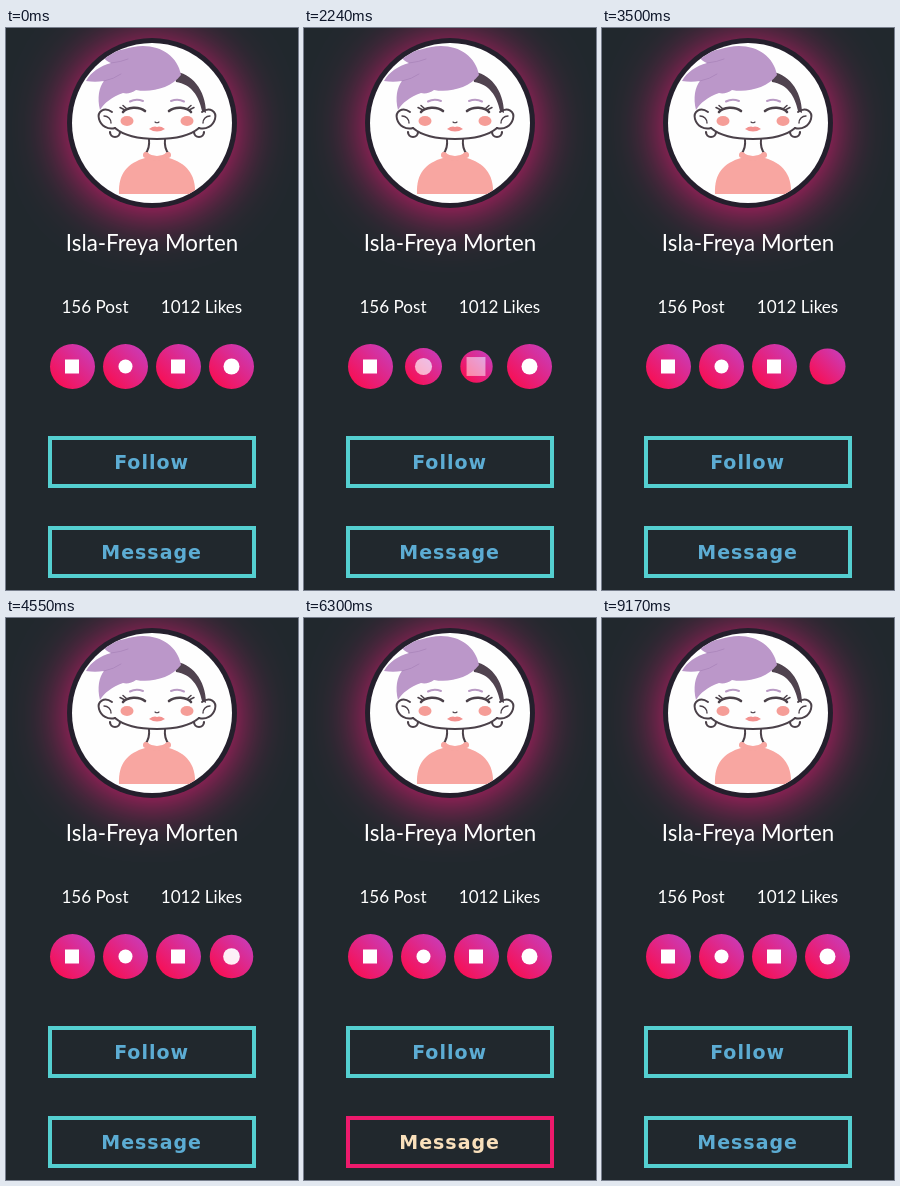
Animation, 292 px wide and 562 px high, one loop 9.31 s. Source, as an HTML page with a canvas:

```html
<!DOCTYPE html>
<html lang="en">
<head>
<meta charset="utf-8">
<title>Profile card</title>
<style>
  html, body { margin: 0; width: 100%; height: 100%; overflow: hidden; background: #21282d; }
  canvas, svg { position: absolute; left: 0; top: 0; width: 292px; height: 562px; }
  text { text-anchor: middle; fill: #fff; font-family: Lato, sans-serif; }
  .name { font-size: 22.3px; }
  .stat { font-size: 17.1px; }
  .label { font: bold 19px "DejaVu Sans", sans-serif; letter-spacing: 1px; }
</style>
</head>
<body>
<canvas id="stage"></canvas>
<svg viewBox="0 0 292 562">
  <text class="name" x="146" y="223">Isla-Freya Morten</text>
  <text class="stat" x="89" y="285">156 Post</text>
  <text class="stat" x="195.5" y="285">1012 Likes</text>
  <text class="label" x="145.6" y="441">Follow</text>
  <text class="label" x="145.6" y="531">Message</text>
</svg>
<script>
const W = 292, H = 562, LOOP = 9310;
const ICON_MS = 300, BUTTON_MS = 350;
const INK = '#4b4149', HAIR = '#bb97c9', CORAL = '#f8a6a1';
const TEAL = [84, 207, 208], PINK = [238, 26, 108];
const BLUE = [92, 172, 211], CREAM = [249, 224, 187];

// on/off: when the pointer enters and leaves
const icons = [
  { x: 66.5, size: 14, round: false, on: 135, off: 1137 },
  { x: 119.5, size: 14, round: true, on: 1230, off: 2085 },
  { x: 172.5, size: 14, round: false, on: 2183, off: 2990 },
  { x: 225.5, size: 16, round: true, on: 3170, off: 4320 }
];
const labels = document.querySelectorAll('.label');
const buttons = [
  { y: 408, label: labels[0], on: 4660, off: 5580 },
  { y: 498, label: labels[1], on: 5920, off: 7045 }
];

const canvas = document.getElementById('stage');
const ctx = canvas.getContext('2d');
const ratio = window.devicePixelRatio || 1;
canvas.width = W * ratio;
canvas.height = H * ratio;
ctx.scale(ratio, ratio);

// cubic-bezier(.25, .1, .25, 1)
function ease(p) {
  if (p <= 0) return 0;
  if (p >= 1) return 1;
  let lo = 0, hi = 1, u = 0.5;
  for (let i = 0; i < 24; i++) {
    u = (lo + hi) / 2;
    const x = 0.75 * u * (1 - u) + u ** 3;
    if (x < p) lo = u; else hi = u;
  }
  return 0.3 * u * (1 - u) ** 2 + 3 * u * u * (1 - u) + u ** 3;
}

const hover = (t, item, ms) => ease((t - item.on) / ms) - ease((t - item.off) / ms);

const mix = (a, b, k) => `rgb(${a.map((v, i) => Math.round(v + (b[i] - v) * k)).join(',')})`;

function oval(x, y, rx, ry, color) {
  ctx.fillStyle = color;
  ctx.beginPath();
  ctx.ellipse(x, y, rx, ry, 0, 0, Math.PI * 2);
  ctx.fill();
}

const disc = (x, y, r, color) => oval(x, y, r, r, color);

function fill(d, color) {
  ctx.fillStyle = color;
  ctx.fill(new Path2D(d));
}

function line(d, color, width) {
  ctx.strokeStyle = color;
  ctx.lineWidth = width;
  ctx.stroke(new Path2D(d));
}

function diagonal(x, y, r) {
  const g = ctx.createLinearGradient(x - r, y + r, x + r, y - r);
  g.addColorStop(0, '#ff0844');
  g.addColorStop(1, '#c441c4');
  return g;
}

// Half of the features, drawn left and then mirrored
function faceSide() {
  line('M106 84 C98 78 91 84 93 91 C95 98 102 102 109 100', INK, 2);
  line('M98 88 C102 88 105 91 105 95', INK, 1.4);
  line('M104 104 A5 5 0 1 0 114 104', INK, 2.2);
  line('M109 100 C117 107 130 111 151 111', INK, 2);
  line('M117 84 C121 79 133 78 139 83', INK, 2.6);
  line('M119 82 L114 79.5 M121 81 L117 77.5', INK, 1.5);
  line('M124 73.5 Q130 70.5 137 73', '#b99ac4', 2);
  oval(121, 93, 6.5, 5, '#f59d97');
}

function drawAvatar() {
  ctx.save();
  ctx.shadowColor = '#f5187a';
  ctx.shadowBlur = 54 * ratio;
  ctx.shadowOffsetY = 4 * ratio;
  disc(146, 95, 83, '#241f2c');
  ctx.restore();
  disc(146, 95, 85, '#241f2c');

  ctx.save();
  ctx.beginPath();
  ctx.arc(146, 95, 80, 0, Math.PI * 2);
  ctx.clip();
  ctx.fillStyle = '#fefefe';
  ctx.fillRect(60, 10, 172, 172);
  ctx.lineCap = ctx.lineJoin = 'round';

  fill('M113 166 C112 145 122 135 139 130 L163 130 C180 135 190 146 189 166 Z', CORAL);
  fill('M142 111 L160 111 L163 129 Q151 134 139 129 Z', '#fefefe');
  line('M143 111 Q144 121 139 126 M159 111 Q158 121 163 126', INK, 2);
  line('M140 127 Q151 134 162 127', CORAL, 5);
  disc(140, 127, 3, CORAL);
  disc(162, 127, 3, CORAL);

  fill('M168 44 C185 44 200 62 200 85 L196 83 C193 68 185 56 170 54 Z', '#50434f');

  faceSide();
  ctx.save();
  ctx.translate(302, 0);
  ctx.scale(-1, 1);
  faceSide();
  ctx.restore();

  line('M149 94 Q151 95.5 153 94', INK, 1.2);
  fill('M143 101 Q148 97.5 151 99 Q154 97.5 159 101 Q151 106 143 101 Z', '#f3918f');

  fill('M175 47 C172 29 156 18 137 18 C122 18 109 26 95 24 '
     + 'C97 30 100 33 105 35 C94 38 85 44 80 53 C86 54 92 54 98 53 '
     + 'C93 59 91 70 94 82 C98 75 106 69 117 65 '
     + 'C121 66 126 65 130 62 C145 65 165 60 175 47 Z', HAIR);
  line('M105 35 Q115 34 122 31 M98 53 Q108 51 115 46', '#ad88bd', 1);
  ctx.restore();
}

function drawIcon(icon, k) {
  const y = 338.5;
  if (k < 1) disc(icon.x, y, 22.5 * (1 - k), diagonal(icon.x, y, 22.5 * (1 - k)));
  const r = icon.size / 2 * (1 + 1.25 * k);
  const shape = color => {
    if (icon.round) return disc(icon.x, y, r, color);
    ctx.fillStyle = color;
    ctx.fillRect(icon.x - 0.5 - r, y - r, 2 * r, 2 * r);
  };
  if (k > 0) shape(diagonal(icon.x, y, r));
  if (k < 1) shape(`rgba(255,255,255,${(1 - k) ** 2})`);
}

function drawButton(button, k) {
  ctx.strokeStyle = mix(TEAL, PINK, k);
  ctx.lineWidth = 4;
  ctx.strokeRect(44, button.y + 2, 204, 48);
  button.label.style.fill = mix(BLUE, CREAM, k);
}

function frame() {
  const t = performance.now() % LOOP;
  ctx.fillStyle = '#21282d';
  ctx.fillRect(0, 0, W, H);
  drawAvatar();
  icons.forEach(icon => drawIcon(icon, hover(t, icon, ICON_MS)));
  buttons.forEach(button => drawButton(button, hover(t, button, BUTTON_MS)));
  requestAnimationFrame(frame);
}
frame();
</script>
</body>
</html>
```
